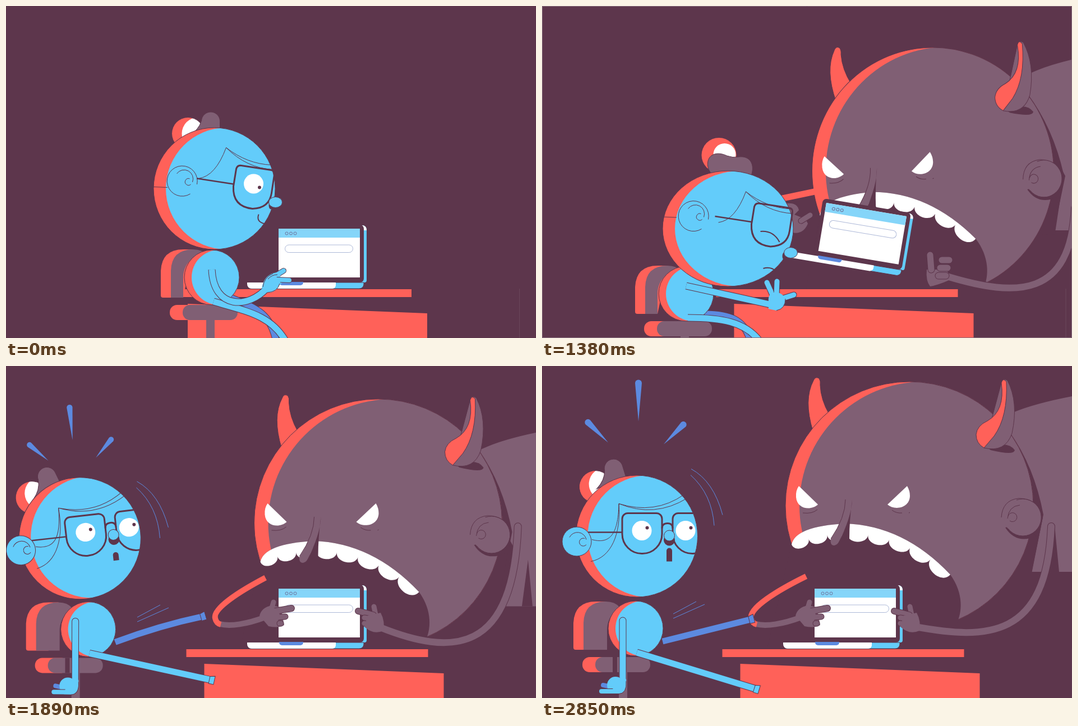
These frames come from a looping animation (945x592 px, 2880 ms). An HTML page with a canvas:

```html
<!DOCTYPE html>
<html lang="en">
<head>
<meta charset="utf-8">
<title>Laptop thief</title>
<style>
html, body { margin: 0; width: 100%; height: 100%; overflow: hidden; background: #5d364c; }
canvas { display: block; }
</style>
</head>
<body>
<canvas id="stage" width="945" height="592"></canvas>
<script>
const ctx = document.getElementById('stage').getContext('2d');
const DARK = '#5d364c', MAUVE = '#805f74', RED = '#ff6159', SKY = '#63ccfa', BLUE = '#5c8ae0', WHITE = '#fff';
const LOOP = 2880, STEP = 30;
// Story beats: devil appears, snatches the laptop, woman turns round, is thrown back.
const ENTER = 900, SNATCH = 1380, TURN = 1500, THROWN = 1710, END = 2850;

const mix = (a, b, k) => a + (b - a) * k;
const ramp = (t, a, b) => Math.min(1, Math.max(0, (t - a) / (b - a)));
const ease = (t, a, b) => { const k = ramp(t, a, b); return k * k * (3 - 2 * k); };

// Progress of the current frame, set once per frame.
let pull, recoil, after, shock, sway;
const settle = power => 1 - (1 - after) ** power;
function setTime(t) {
  pull = ease(t, ENTER, SNATCH);
  recoil = ease(t, SNATCH, THROWN);
  after = ramp(t, THROWN, END);
  shock = (1 - after) ** 6;
  sway = 4 * settle(2) * (1 - settle(2));
}
// A value that passes through the four poses of the story.
const pose = (rest, grab, hit, end, power = 6) =>
  mix(mix(mix(rest, grab, pull), hit, recoil), end, settle(power));

function fill(d, color) {
  ctx.fillStyle = color;
  ctx.fill(new Path2D(d));
}
function line(d, color = DARK, width = 1) {
  ctx.strokeStyle = color;
  ctx.lineWidth = width;
  ctx.stroke(new Path2D(d));
}
function shape(d, color) {
  fill(d, color);
  line(d);
}
function oval(x, y, rx, ry, color) {
  ctx.beginPath();
  ctx.ellipse(x, y, rx, ry, 0, 0, 7);
  ctx.fillStyle = color;
  ctx.fill();
}
function box(x, y, w, h, radii, color, stroke) {
  ctx.beginPath();
  ctx.roundRect(x, y, w, h, radii);
  if (color) { ctx.fillStyle = color; ctx.fill(); }
  if (stroke) { ctx.strokeStyle = stroke; ctx.stroke(); }
}
function group(x, y, degrees, draw) {
  ctx.save();
  ctx.translate(x, y);
  ctx.rotate(degrees * Math.PI / 180);
  draw();
  ctx.restore();
}
// Disc with a crescent of rim colour on its left side.
function ball(x, y, rx, ry, shift, rim, color) {
  ctx.save();
  oval(x, y, rx, ry, rim);
  ctx.clip();
  oval(x + shift, y, rx, ry, color);
  ctx.restore();
  ctx.beginPath();
  ctx.ellipse(x, y, rx, ry, 0, 0, 7);
  ctx.strokeStyle = DARK;
  ctx.lineWidth = 1;
  ctx.stroke();
}
function limb(d, width, color, cap = 'butt') {
  ctx.lineCap = cap;
  line(d, DARK, width + 2);
  line(d, color, width);
  ctx.lineCap = 'butt';
}
const finger = (x1, y1, x2, y2, width, color) => limb(`M${x1},${y1}L${x2},${y2}`, width, color, 'round');

function devilMouth() {
  const arch = 'M445,318Q452,286 540,281Q645,284 728,372';
  fill(arch + 'C752,405 750,440 738,462L700,510H400Z', DARK);
  const along = (k, a, b, c, d) => a * (1 - k) ** 3 + 3 * b * k * (1 - k) ** 2 + 3 * c * k * k * (1 - k) + d * k ** 3;
  const gum = k => [along(k, 728, 640, 520, 445), along(k, 372, 285, 285, 318)];
  let teeth = arch;
  for (let i = 0; i < 8; i++) {
    const [x1, y1] = gum(i / 8), [x2, y2] = gum((i + 1) / 8);
    const dx = (y2 - y1) * .52, dy = (x1 - x2) * .52;
    teeth += `C${x1 + dx},${y1 + dy} ${x2 + dx},${y2 + dy} ${x2},${y2}`;
  }
  fill(teeth, WHITE);
}

function devilHead() {
  group(pose(40, 40, 20, 0, 1), pose(-30, 33, 73, 0, 1), 0, () => {
    fill('M800,100L842,82Q890,62 990,46V367H873L893,270Z', MAUVE);
    fill('M914,284L922,367H903Z', DARK);
  });
  group(pose(688, 697, 666, 655, 1.5), pose(170, 295, 289, 249, 1.5), pose(0, -2.4, 0, 0), () => {
    ctx.scale(pose(1, .975, 1, 1), 1);
    ctx.translate(-655, -249);
    fill('M834,118Q878,180 894,265L873,370H820V118Z', DARK);
    shape('M483,116Q466,60 484,26Q487,18 494,22Q497,26 496,34Q497,60 512,86Z', RED);
    ball(655, 249, 221, 221, 25, RED, MAUVE);
    // ear
    fill('M826,288Q845,318 880,304L870,280Z', DARK);
    oval(857, 270, 33, 33, MAUVE);
    line('M831,290A33,33 0 1 0 846,239M819,270Q821,239 850,236Q866,236 876,243M830,272Q832,250 852,248M831,268A8,8 0 1 1 834,276');
    // right horn
    fill('M795,146Q830,132 843,150Q842,160 800,150Z', DARK);
    shape('M819,30Q822,20 830,26Q850,65 838,120Q826,155 788,146Z', MAUVE);
    shape('M819,30Q822,20 828,28Q831,90 806,125L788,146Q774,138 774,122Q776,106 794,98Q826,80 819,30Z', RED);
    // eyes
    fill('M458,214L492,247C480,258 455,256 453,234Q452,222 458,214Z', WHITE);
    fill('M651,214L616,247C628,258 655,254 656,232Q656,222 651,214Z', WHITE);
    line('M465,262Q482,264 491,256M624,257Q632,263 642,262M654,262L656,261');
    devilMouth();
    // nose
    fill('M541,238Q541,270 515,308Q513,320 521,320Q530,318 535,302Q552,270 553,238Z', MAUVE);
    fill('M553,238Q548,275 548,308L528,316Q552,270 553,238Z', DARK);
    line('M541,238Q541,270 515,308');
  });
}

function desk() {
  group(pose(0, 18.5, 29.5, 29.5), 0, 0, () => {
    fill('M292,505H723V519H292Z', RED);
    fill('M324,531L751,548V592H324Z', RED);
    line('M915.5,504V592', '#6a465b');
  });
}

function laptop() {
  ctx.lineWidth = 1;
  box(590, 391, 53, 102, [0, 8, 4, 0], SKY);
  fill('M634,391Q643,391 643,400H634Z', WHITE);
  box(479, 390, 159, 103, 7, DARK);
  box(430, 493, 208, 11, [0, 0, 8, 8], SKY, DARK);
  box(430, 493, 158, 11, [0, 0, 6, 8], WHITE);
  box(487, 492, 43, 6, [0, 0, 5, 5], BLUE);
  fill('M486,397H631V484H486Z', WHITE);
  fill('M486,397H631V413H486Z', '#85d5f9');
  for (let i = 0; i < 3; i++) box(498 + i * 7.5, 403, 5, 5, 2.5, null, '#6d6f98');
  box(497.5, 426, 121, 13.5, 7, null, '#aeb9d8');
}

function holdingHands() {
  finger(477, 421, 472, 438, 9, MAUVE);
  fill('M452,445Q456,430 474,427L490,430L496,462Q485,468 468,464Z', MAUVE);
  finger(488, 459, 490, 459, 9, MAUVE);
  finger(485, 448, 498, 447, 9, MAUVE);
  finger(481, 437, 509, 432, 10, MAUVE);
  oval(473, 445, 15, 14, MAUVE);
  finger(656, 429, 660, 448, 9, MAUVE);
  finger(628, 437, 655, 444, 10, MAUVE);
  for (const y of [449, 459]) finger(639, y, 651, y + 2, 9, MAUVE);
  fill('M645,445L668,440Q676,455 673,472Q655,480 639,465Z', MAUVE);
}

function snatchingHands(x, y) {
  group(x, y, 0, () => {
    fill('M-36,-12H0L6,6Q-17,16 -30,18Q-38,8 -36,-12Z', MAUVE);
    finger(-30, -38, -28, -12, 11, MAUVE);
    for (let i = 0; i < 3; i++) finger(-9 - i * 3, i * 14 - 29, 4 - i * 3, i * 14 - 29, 11, MAUVE);
  });
  line('M424,344L486,331', RED, 11);
  fill('M436,352Q455,350 458,364L450,372L470,380L474,388Q466,408 446,404Z', MAUVE);
  finger(462, 383, 478, 373, 9, MAUVE);
}

function devilArms(t, lift) {
  const x = pose(722, 722, 670, 666), y = pose(482, 482, 468, 465);
  const endX = pose(950, 950, 914, 908, 1.5), low = pose(520, 520, 525, 488, 1.5);
  limb(`M${x},${y}C${x + 126},${low} ${endX - 8},${low} ${endX},${pose(360, 360, 287, 286)}`, 12, MAUVE, 'round');
  if (t < TURN) return snatchingHands(x, y);
  line('M381,460C400,465 430,460 462,448', MAUVE, 10);
  line(`M${mix(461, 471, after)},${mix(378, 375, after)}C420,400 368,432 373,450Q375,459 383,461`, RED, 10);
  placeLaptop(lift, holdingHands);
}

function placeLaptop(lift, draw) {
  group(486 + 21 * lift, 397 - 46 * lift, 9.5 * lift, () => { ctx.translate(-486, -397); draw(); });
}

function chair(x, y, gap) {
  group(x, y, 0, () => {
    const edge = 316 + gap;
    fill('M276,516V472Q278,434 316,434H334L316,520H280Q276,520 276,516Z', RED);
    fill(`M294,520V472Q295,434 334,434Q350,434 358,444L${edge + 14},452Q${edge},465 ${edge},485V520Z`, MAUVE);
    fill('M357,555H372V620H357Z', MAUVE);
    box(292, 533, 60, 27, 13, RED);
    box(315, 533, 98, 27, 13, MAUVE);
  });
}

function bun(squashed) {
  if (squashed) {
    oval(-16, -131, 31, 31, RED);
    oval(-6, -132, 20, 20, WHITE);
    shape('M-36,-112C-38,-134 -18,-138 -2,-130Q8,-126 20,-128C40,-130 48,-114 42,-96L-22,-94Q-34,-98 -36,-112Z', MAUVE);
    return;
  }
  ball(-47, -98, 29, 29, 18, RED, WHITE);
  shape('M-46,-94Q-28,-104 -23,-121A16.5,16.5 0 0 1 10,-119V-100Z', MAUVE);
}

function profile(crouch) {
  const rx = mix(108.5, 116.5, pull), ry = mix(108.5, 103, pull);
  bun(crouch);
  ball(0, 0, rx, ry, 22, RED, SKY);
  line(`M${-rx},${mix(-3, -21, pull)}l25,1`);
  group(8 * pull, -4 * pull, 0, () => {
    group(3 * pull, 11 * pull, 0, () => line('M21,-73Q2,-22 -28,-18M21,-73Q58,-44 102,-42M21,-73Q58,-36 105,-34'));
    line('M34,-8L-31,-18', DARK, 2.5);
    line('M39,-35Q41,-42 48,-41L101,-33Q108,-32 107,-25L102,8Q98,35 68,36Q32,32 34,-4Z', DARK, 3);
    if (crouch) line('M50,9Q73,7 84,28', DARK, 2);
    else {
      oval(70, -8.5, 17.5, 17.5, WHITE);
      oval(80.5, -2, 3, 3, DARK);
    }
  });
  group(-57 - 4 * pull, -13.5 - 9 * pull, 0, () =>
    line('M14,23A27,27 0 1 1 26,6M-10,-13A16,16 0 0 1 18,2M13,-4A6,6 0 1 0 15,6'));
  oval(101, 30 + 19 * pull, 4, 7, DARK);
  ball(109 + 3 * pull, 24.5 + 18.5 * pull, 12, 9.5, 0, SKY, SKY);
  line(crouch ? 'M63,71Q76,67 86,76' : 'M79,46Q74,60 91,63', DARK, 2);
}

function facing() {
  group(0, -8 * (1 - shock), -17 - 3 * sway, () => bun(false));
  ball(0, 0, 108.5, 108.5, 21, RED, SKY);
  ctx.save();
  ctx.beginPath();
  ctx.arc(0, 0, 108.5, 0, 7);
  ctx.clip();
  line('M-32,-58Q32,-32 90,-68M-32,-58Q32,-38 84,-74M-32,-58C-33,0 -50,14 -80,6');
  if (shock < .6) line('M-32,-58C-28,-5 -45,38 -82,45');
  ctx.translate(6 * shock, 4 * shock);
  line('M-90,-7H-26', DARK, 2.5);
  ctx.lineWidth = 3;
  for (const x of [-26, 64]) box(x, -41, 71, 72, [10, 10, 35, 35], null, DARK);
  line('M45,-14Q45,-23 55,-23Q64,-23 64,-14', DARK, 3);
  for (const x of [9, 87]) {
    oval(x, -10 - 3 * shock, 17.5, 17.5 - 2.5 * shock, WHITE);
    oval(x + 9.5, -15, 3, 3, DARK);
  }
  oval(58, 7, 10, 10, DARK);
  ball(58, -1, 9.5, 9.5, 0, SKY, SKY);
  const mouth = 12 + 12 * settle(1.5);
  if (shock > .6) fill('M56,41Q57,29 63,29Q68,29 70,41Z', DARK);
  else box(53, 45 - mouth, 10, mouth, [5, 5, 0, 0], DARK);
  ctx.restore();
  ball(-107, 9.5, 26, 26, 0, SKY, SKY);
  line('M-120,2A16,16 0 0 1 -90,6M-93,4A7,7 0 1 0 -90,15');
}

function typingHand(press) {
  finger(474, 485, 495 - 8 * press, 472 + press, 8, SKY);
  fill('M456,503Q459,484 474,477L487,474L492,494Q487,497 485,502Q478,512 466,511Z', SKY);
  finger(484, 488, 505, 489, 8, SKY);
  oval(476, 493, 13, 11, SKY);
  line('M458,501Q460,484 476,477M488,495Q484,510 466,511M467,487Q474,479 484,479');
}

function spreadHand() {
  finger(-2, -14, -14, -41, 9, SKY);
  finger(3, -16, 4, -43, 9, SKY);
  finger(9, -11, 34, -19, 9, SKY);
  fill('M-11,-6Q-13,-22 1,-24Q17,-22 19,-8Q17,6 3,9L-11,6Z', SKY);
  line('M19,-12Q19,6 3,9');
}

function hangingHand() {
  finger(-35, -3, -26, -1, 8, BLUE);
  oval(-13, -3, 15, 15, SKY);
  finger(-38, 8, -8, 8, 8, SKY);
  fill('M-14,-10L6,-14Q8,12 -6,12H-20Z', SKY);
  line('M6,-10Q8,12 -8,13');
}

// Sitting leg: the knee rises as the hip sinks towards the floor.
function bentLeg(x, y, start, lift, reach, color) {
  const floor = 600, knee = (floor - y - 44) * .6;
  limb(`M${x + start},${y - lift}C${x + start / 2 + 58},${y + knee - lift} ${x + 103},${y + knee + 6 - lift / 2} ${x + reach},${floor}`, 11, color);
}
function kickedLeg(x, y, length, angle, arch, color) {
  group(x, y, angle, () => {
    limb(`M0,0C${length / 3},${-arch} ${length * 2 / 3},${-arch} ${length},0`, 11, color);
    shape(`M${length - 7},-6L${length + 2},-8V7H${length - 7}Z`, color);
  });
}

function reachingArm(x, y, t, crouch) {
  const handX = mix(466, 415, pull), handY = mix(502, 534, pull), sag = 1 - pull;
  const third = (mix(x, handX, 1 / 3) - 30 * sag) + ',' + (mix(y, handY, 1 / 3) + 61 * sag);
  const twoThirds = mix(x, handX, 2 / 3) + ',' + (mix(y, handY, 2 / 3) + 49 * sag);
  limb(`M${x},${y}C${third} ${twoThirds} ${handX},${handY}`, 11, SKY);
  if (crouch) return group(handX, handY, 0, spreadHand);
  const taps = t < 630 ? 3 * ramp(t, 150, 630) : ramp(t, 720, ENTER);
  group(handX - 466, handY - 502, 0, () => typingHand((1 - Math.cos(2 * Math.PI * taps)) / 2));
}

function person(t) {
  const late = t >= TURN, crouch = t >= 1260 && !late;
  const gap = pose(0, 0, 20, 20);
  const chairX = pose(0, -110, -277, -220) - 80 * Math.sin(Math.PI * pull), chairY = pose(0, 29, -10, -14);
  const x = 367 + chairX + gap, y = 484 + chairY - gap / 10;
  const headX = x + pose(4.5, 74.5, 1, 2) - 20 * sway, headY = y + pose(-158.5, -116, -158, -164.5);
  const swing = 36 * (1 - after) ** 3 * Math.cos(10 * after);
  const tilt = -7.8 * sway;

  if (late) kickedLeg(x + 48, y + 23, 166, -14 + 12 * shock - 8 * sway, 12 * shock, BLUE);
  else bentLeg(x + 3, y + 43, 30, 7, 112, BLUE);
  chair(chairX, chairY, gap);
  if (late) box(x - 41 + 1.3 * swing, 533 + chairY, 8, 27, 0, DARK);
  ball(x, y, 49, 49, 13, RED, SKY);
  if (late) kickedLeg(x + 2, y + 43, 226, 17 - 20 * shock + 3 * sway, 0, SKY);
  else bentLeg(x + 3, y + 43, 0, 0, 130, SKY);
  group(headX, headY, tilt, () => late ? facing() : profile(crouch));
  if (late) {
    group(x - 23 + swing / 4, y - 14, -swing, () => {
      limb('M0,0V110', 11, SKY, 'round');
      ctx.translate(0, 118);
      hangingHand();
    });
    marks(t, headX, headY, tilt);
  } else reachingArm(x, y - 14, t, crouch);
}

function marks(t, x, y, tilt) {
  if (t > 1620) group(0, 17 * shock, 0, () => line('M234,442L275,420M234,450L290,425', BLUE));
  if (t < 1770) return;
  const size = .83 + .17 * after;
  group(x, y, tilt * .8, () => {
    ctx.scale(size, size);
    fill('M-3,-273a5.5,5.5 0 0 1 12,0L3,-205Z', BLUE);
    fill('M-91,-199a5,5 0 0 1 8,-8L-51,-167Z', BLUE);
    fill('M79,-203a5,5 0 0 1 8,8L48,-164Z', BLUE);
  });
  const sink = 130 * (1 - size);
  group(x + sink / 4, y + sink, 0, () => line('M97,-120Q137,-98 153,-38M96,-109Q134,-75 138,-19', BLUE));
}

function frame() {
  const t = Math.floor(performance.now() % LOOP / STEP) * STEP;
  setTime(t);
  const lift = ease(t, 1230, SNATCH) * (1 - ease(t, SNATCH, 1560));
  const away = 640 * (1 - ramp(t, ENTER, 1200)) ** 2;
  ctx.fillStyle = DARK;
  ctx.fillRect(0, 0, 945, 592);
  if (t > ENTER) group(away, 0, 0, devilHead);
  desk();
  placeLaptop(lift, laptop);
  if (t > 1200) devilArms(t, lift);
  person(t);
  if (t >= 1260 && t < 1800) line('M.5,.5H944.5V591.5H.5Z', '#8a7180');
  requestAnimationFrame(frame);
}
frame();
</script>
</body>
</html>
```
